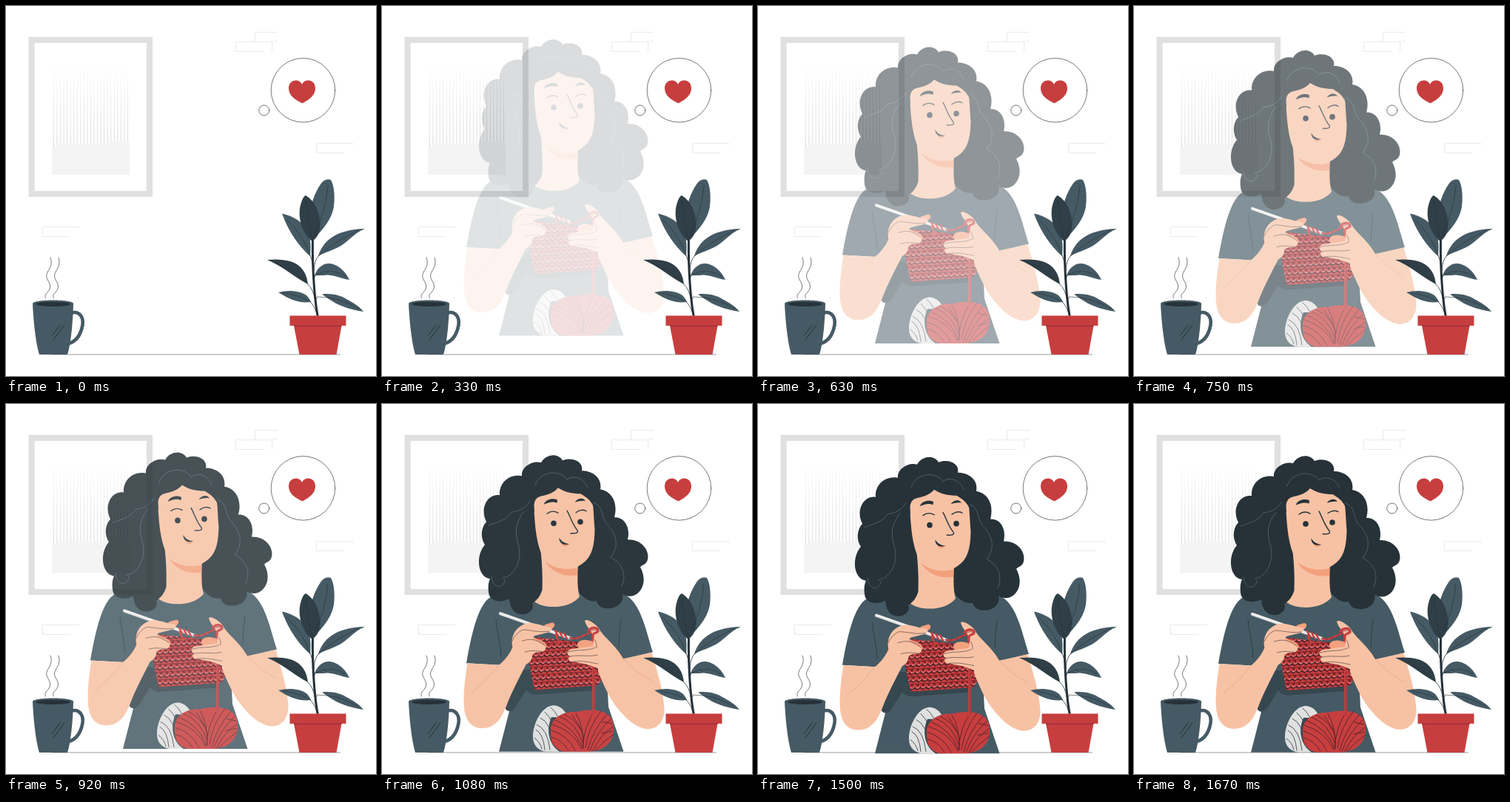
These frames come from a looping animation (500x500 px, 1710 ms). An HTML page:

```html
<!DOCTYPE html>
<html lang="en">
<head>
<meta charset="utf-8">
<title>Knitting</title>
<style>
  html, body { margin: 0; width: 100%; height: 100%; overflow: hidden; background: #fff; }
  svg { display: block; width: 100vw; height: 100vh; }
  .line { fill: none; stroke-linecap: round; stroke-linejoin: round; }
  .ink { stroke: #263238; }
  .dark { fill: #263238; }
  .slate { fill: #455a64; }
  .deep { fill: #303f47; }
  .skin { fill: #f7c2a4; }
  .blush { fill: #f3a07d; }
  .red { fill: #c73e3e; }
  .yarn { stroke: #c73e3e; }
  .fold { stroke: #e5a483; stroke-width: .8; }
</style>
</head>
<body>
<svg viewBox="0 0 500 500">
  <defs>
    <clipPath id="knitShape"><path d="M208 316C203 326 197 336 198 347C201 360 203 376 207 387L290 381C296 379 297 370 297 360L294 324L262 322Z"/></clipPath>
  </defs>

  <!-- Wall -->
  <rect x="34.5" y="45.8" width="159.5" height="208.2" fill="none" stroke="#e0e0e0" stroke-width="8"/>
  <path id="fringe" fill="#e0e0e0"/>
  <path fill="#f4f4f4" d="M62 191C70 188 76 185 86 186C97 189 105 185 116 186C127 187 135 186 142 183C151 182 158 185 167 184V228H62Z"/>
  <path id="bricks" class="line" stroke="#ebebeb"/>
  <g class="line ink" stroke-width=".65">
    <circle cx="401.5" cy="113.8" r="43.3"/>
    <circle cx="348.8" cy="141" r="7"/>
  </g>
  <path class="red" d="M400.5 131.5C392 127 382 122 382 111C382 104 387 100.5 391.5 100.5C396 100.5 399 103 400 106C401 103 404 100.5 408.5 100.5C414 100.5 418 105 418 111C418 121 410 126 400.5 131.5Z"/>
  <path d="M62 471H452" stroke="#b9bcbe" stroke-width="1.4"/>

  <!-- Mug -->
  <path class="line" stroke="#455a64" stroke-width="4.6" d="M89 414.5C99 412 105 420 103.5 431C101 445 95 453 85 456"/>
  <path class="slate" d="M36 402C37 425 40 455 45 471H83C88 455 90.5 425 91 402C90 396 37 396 36 402Z"/>
  <ellipse class="dark" cx="63.5" cy="402.8" rx="23.5" ry="3.1"/>
  <path class="line ink" d="M62 446L73 431M64 451L79 431"/>
  <g class="line ink" stroke-width=".65">
    <path id="steam" d="M60 340C63 348 60 353 57 358C53 364 55 368 58 373C62 380 58 385 55 388C52 391 53 393 53.500 395"/>
    <use href="#steam" x="10.8"/>
  </g>

  <g id="woman" opacity="0">
    <path class="slate" d="M146 262C131 272 122 305 114 351L160 353.5L180 385L173 412L158 470.6H326.5L306 410L304 370L326 346L366 336C356 305 350 270 328 258L262 250L205 262Z"/>
    <path fill="#37474f" d="M166 411C169 418 176 417 180 411L195 387C200 394 208 394 215 393L285 388V360H185Z"/>
    <path class="line ink" stroke-width=".7" d="M154 292C156 310 160 325 161 342M323 291C321 305 321 315 320 328"/>

    <!-- Hair, neck and face -->
    <path class="dark" d="M189 98C188 86 203 77 215 80C222 68 238 67 244 77C256 72 273 78 270 91C285 91 298 101 295 116C312 119 319 136 314 154C328 153 336 168 332 184C350 183 362 198 359 211C357 218 353 217 349 221C357 236 354 250 345 257C338 262 332 261 325 258C328 270 316 278 304 277C296 277 291 272 290 267C278 270 262 256 260 240L220 240C219 255 212 266 203 270C207 278 198 286 188 285C178 284 173 276 172 264C160 270 145 268 144 255C143 247 144 241 146 237C129 235 126 206 139 191C133 182 133 169 141 160C132 142 142 122 159 124C158 107 172 95 189 98Z"/>
    <path class="skin" d="M214 195C217 220 217 240 216.5 252C214 260 210 265 206 268C222 279 255 277 267 261C264 250 264 238 265 215Z"/>
    <path class="blush" d="M220 213C232 223 250 226 264 222L264 232C246 235 229 228 220 213Z"/>
    <path class="skin" d="M205 130C206 160 208 198 222 213C235 225 257 227 270 217C283 208 287 195 287.500 170C286 152 286 140 283 115L240 100L206 115Z"/>
    <path class="dark" d="M200 150L206 146C204 133 207 127 216 125C226 123 233 120 238 114C247 120 257 122 268 122C276 126 283 132 286 140L298 122L262 90L215 92L198 120Z"/>
    <g class="line" stroke="#4c626d" stroke-width=".9">
      <path d="M207 111C212 92 240 88 250 103C260 96 273 101 278 114"/>
      <path d="M144 165C160 159 169 157 175 147C184 146 193 143 200 132"/>
      <path d="M192 146C179 163 180 175 184 190C190 207 182 233 163 236"/>
      <path d="M148 234C149 250 165 252 166 238"/>
      <path d="M286 134C300 140 296 153 303 162C316 175 322 192 309 208C325 216 331 231 324 247"/>
    </g>
    <path class="dark" d="M218.500 136.500C222 129 231 127.500 237 130.500L236.500 134.500C230 132 225 134 218.500 136.500ZM260.500 133.500C265 127.500 272 127 275 132C270 131 266 132 260.500 133.500Z"/>
    <circle class="dark" cx="232" cy="162" r="3.800"/>
    <circle class="dark" cx="268" cy="160" r="3.800"/>
    <path class="blush" d="M241 186L252 191C249 195 243 194 241 186Z"/>
    <path class="dark" d="M239.500 181.500C242 186 246 189 253.500 190C246 192.500 239 189 239.500 181.500Z"/>
    <path class="line ink" stroke-width="1.400" d="M223 149Q230 143.500 238 148M262 147.500Q269 142 276 145.500M250 145C255 154 257 163 264 171.500C266 175 262 176 255 175.500"/>

    <!-- Knitting -->
    <g clip-path="url(#knitShape)">
      <path fill="#74232a" d="M190 305H300V390H190Z"/>
      <path id="stitches" class="line" stroke="#c73e3e" stroke-width="2.900"/>
      <path id="gaps" class="line" stroke="#45202a" stroke-width="1.400"/>
      <path id="shine" class="line" stroke="#eda9a3" stroke-width=".9"/>
    </g>

    <!-- Yarn balls -->
    <path fill="#e0e0e0" d="M204 447C206 427 218 409 231 408C242 408 249 416 252 428L249 470.600H222C209 469 203 460 204 447Z"/>
    <path class="line ink" stroke-width=".8" d="M214 425Q228 431 231 460M220 417Q233 428 236 455M228 411Q240 421 243 440M208 441Q218 446 220 468M206 452Q214 458 216 467M209 434Q224 440 227 468"/>
    <path fill="#37474f" d="M229 424C221 442 226 462 240 470.600H250V424Z"/>
    <path class="red" d="M228 445C226 426 244 416 262 417C283 412 307 413 312 431C316 451 308 468 280 470.600H247C233 468 228 458 228 445Z"/>
    <path class="line" stroke="#54232b" stroke-width=".9" d="M230 434Q258 442 270 467M234 428Q260 438 271 465M240 423Q263 432 272 460M246 420Q267 430 273 452M229 442Q251 448 261 469M229 451Q243 454 252 469M262 419Q273 435 272 466M271 466Q273 435 287 416M275 465Q279 437 296 416M278 468Q285 441 304 420M281 469Q290 444 309 427M285 469Q295 448 312 437M288 469Q300 456 313 447M257 421L269 440M298 430L311 433M297 446L311 443"/>
    <path class="line yarn" stroke-width="3.600" stroke-linecap="butt" d="M285 310C286 340 286 380 286 420"/>
    <path class="line" stroke="#93313a" stroke-width=".8" d="M286.500 350V418" stroke-dasharray="4 2"/>

    <!-- Arms -->
    <path class="skin" d="M115.500 351C112 372 109 398 111.500 415C114 433 126 441 140 438.500C155 436 162 424 168 409C176 388 186 370 196 350L200 340L178 325C174 338 165 348 158 353.500Z"/>
    <path class="skin" d="M326 345L364.500 336.500C370 355 380 387 381.500 412C382 429 373 440 359 440C344 439 331 427 320 414C308 400 300 382 292 362L292 308C299 318 314 325 326 345Z"/>
    <path class="line fold" d="M121 391C134 381 148 367 158 353M326 345C340 360 351 368 365 375"/>

    <!-- Hook and hands -->
    <path class="blush" d="M205 316L218 322C224 326 224 330 219 332L200 340ZM265 323C269 318 279 319 285 322L287 331H267C264 329 263 326 265 323ZM220 299L230 296C235 297 234 302 229 305L217 309Z"/>
    <path class="line" stroke="#dadada" stroke-width="4.200" d="M160 284L254 317"/>
    <path class="line" stroke="#f3f3f3" stroke-width="2.200" d="M160 283.500L254 316.500"/>
    <path class="line yarn" stroke-width="2.600" stroke-linecap="butt" d="M234 307L238 314M240 309L244 316M246 311L250 318M235 312C234 317 240 319 239 324M254 317C267 321 278 308 290 307"/>
    <path class="skin" d="M176 328C174 312 182 302 193 298C204 294 215 301 227 302C232 304 229 309 222 310L206 314C202 318 207 320 216 325C224 329 222 335 214 336C208 336 203 337 203 342C202 348 198 352 190 354Z"/>
    <path class="line" stroke="#5b4545" stroke-width=".7" d="M191 306C201 306 211 310 226 308M189 321C198 319 205 316 220 327M193 336C202 333 208 335 216 335M176 321Q181 310 190 306"/>
    <path class="skin" d="M274 294C276 290 288 297 293 304C301 318 315 325 326 345L301 367C294 355 275 352 258 349C251 348 250 343 255 342C249 340 249 334 255 332L285 328L286 317C284 307 277 304 274 294Z"/>
    <path class="line" stroke="#5b4545" stroke-width=".7" d="M251 336C263 332 279 335 288 330M254 342C266 339 280 343 291 340M258 349C270 347 282 350 292 352M286 318Q291 323 290 330"/>
    <path class="line yarn" stroke-width="3.200" d="M279 307C285 301 293 303 292 308C290 311 284 309 285 316"/>
    <path class="line" stroke="#7f252b" stroke-width=".7" d="M280 309Q286 304 291 307M259 319L262 317M267 317L270 315M274 314L277 312"/>
  </g>

  <!-- Plant -->
  <path class="line ink" stroke-width="3" d="M415 300C413 340 416 390 421 418"/>
  <path class="line ink" stroke-width=".8" d="M423 337Q416 344 416 358M418 363Q415 370 417 380M408 376Q415 382 418 398M411 400Q417 405 420 416M420 394Q417 398 418 405M411 337Q415 345 415 354"/>
  <g class="slate">
    <path d="M414 317C406 290 411 262 425 241C429 235 434 233 439 235C444 243 444.500 260 443 271C440 290 426 304 414 317Z"/>
    <path d="M373 280.500C388 284 400 291 407 303C412 313 412 326 411 338C397 326 382 306 373 280.500Z"/>
    <path d="M422 338C428 318 445 302 485 301C470 307 463 318 451 325C440 331 430 333 422 338Z"/>
    <path d="M417 364C421 353 429 347 438 348C450 350 459 359 464 370C450 368 440 362 430 364Z"/>
    <path d="M368 387C382 383 398 385 406 391C410 395 411 398 412 400C395 402 383 396 368 387Z"/>
    <path d="M427 389.500C440 388 452 391 460 396C469 401 477 405 483 413C470 411 456 407 446 402Q437 397 427 389.500Z"/>
  </g>
  <g class="deep">
    <path d="M414 318C402 310 395 290 397 274C399 263 402 257 405 256C412 260 419 268 422 280C427 296 425 310 414 318Z"/>
    <path d="M353 343C372 341 390 344 398 353C405 360 407 368 408 376C390 367 375 352 353 343Z"/>
  </g>
  <path class="line ink" stroke-width=".6" d="M435 242Q432 280 415 313M405 263Q409 295 414 317M380 289Q402 310 411 337M477 303Q444 318 422 338M360 345Q392 357 408 376M459 365Q438 352 418 364M375 388Q398 391 412 400M477 409Q450 393 420 393"/>
  <path class="red" d="M383.500 418.500H459.500V432H453.500L446.500 471H396.500L389 432H383.500Z"/>
  <path stroke="#90313a" stroke-width="1.300" d="M389 432.300H453.500"/>
</svg>
<script>
  const LOOP = 1710, LEAD = 34, APPEAR = 210, DROP = 30;
  const byId = id => document.getElementById(id);
  const range = (n, f) => Array.from({ length: n }, (_, i) => f(i)).join('');
  const draw = (id, d) => byId(id).setAttribute('d', d);

  draw('fringe', range(23, i => `M${64.4 + i * 4.55} 76l.6 ${114 - i * .2}h-1.2z`));
  draw('bricks', [[310.5, 48.5], [419.5, 185.5], [49.5, 298.5]]
    .map(([x, y]) => `M${x + 37} ${y + 13}H${x}v-13h49v2`).join('') + 'M336.5 48.5v-13h29v2M365.5 46v2h-6v13');

  const eachStitch = f => range(7, row => range(14, col => {
    const x = 196 + col * 7.6 + row % 2 * 2;
    return f(x, 320 + row * 10.3 - (x - 207) * .06);
  }));
  draw('stitches', eachStitch((x, y) => `M${x} ${y - 3}l4 4l5 -4M${x} ${y + 4}l7 -1`));
  draw('gaps', eachStitch((x, y) => `M${x + 1} ${y + 1}l3 2l4 -4`));
  draw('shine', eachStitch((x, y) => `M${x + 3} ${y - 1}l1.5 2l3 -2`));

  const bezier = (a, b, s) => 3 * (1 - s) ** 2 * s * a + 3 * (1 - s) * s * s * b + s ** 3;
  function ease(x) {
    let low = 0, high = 1;
    for (let i = 0; i < 24; i++) {
      const mid = (low + high) / 2;
      if (bezier(.36, .5, mid) < x) low = mid; else high = mid;
    }
    return bezier(-.01, 1.38, low);
  }

  const woman = byId('woman');
  function tick() {
    const time = performance.now() % LOOP;
    const p = ease(Math.min(1, (time + LEAD) / LOOP));
    woman.setAttribute('opacity', time < APPEAR ? 0 : Math.min(1, p));
    woman.setAttribute('transform', `translate(0 ${DROP * (p - 1)})`);
    requestAnimationFrame(tick);
  }
  tick();
</script>
</body>
</html>
```
